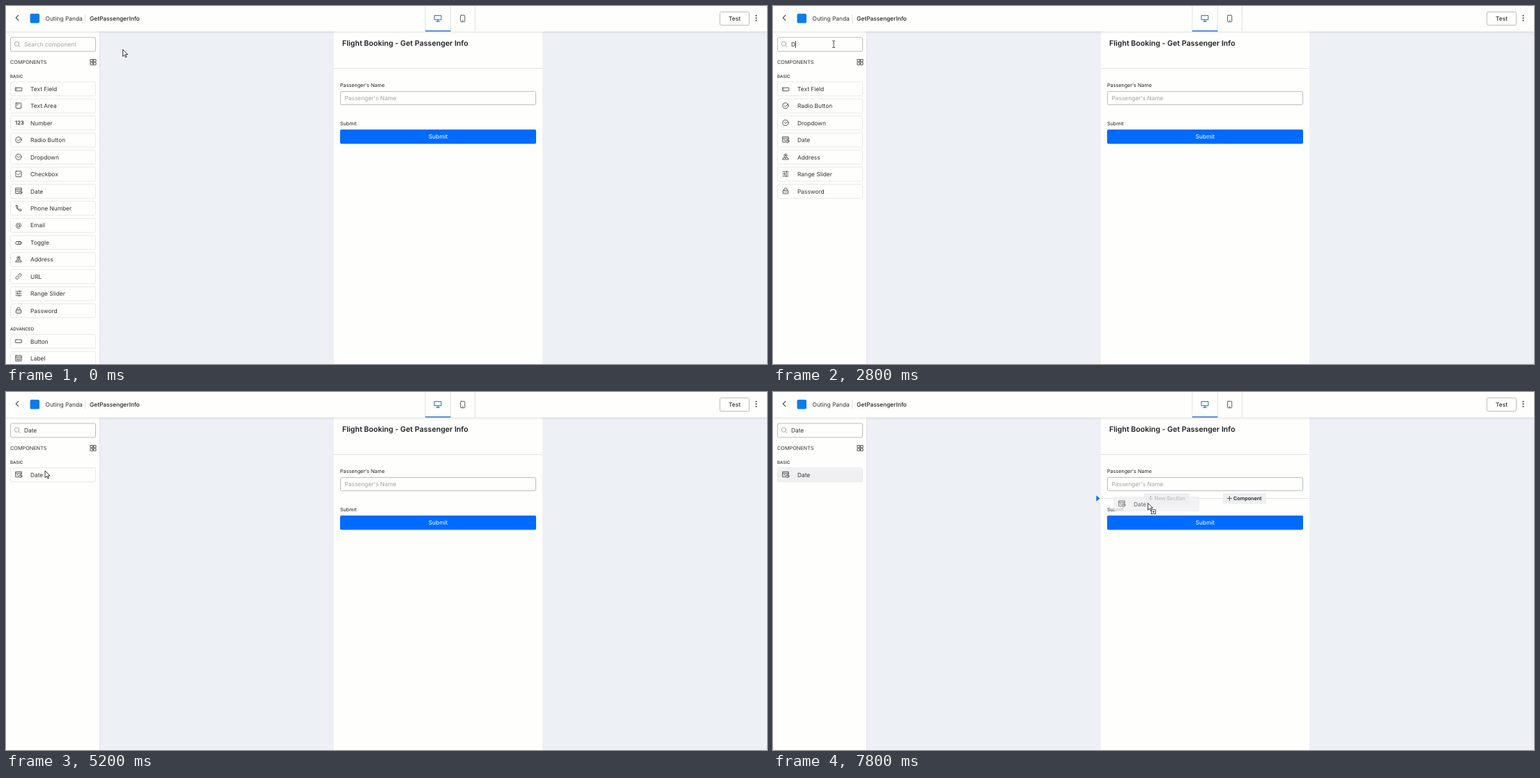
Write an HTML page that moves like this. It is 1091x513 px and loops after 8 s.

```html
<!DOCTYPE html>
<html lang="en">
<head>
<meta charset="utf-8">
<title>Form builder</title>
<style>
  html, body { margin: 0; width: 100%; height: 100%; overflow: hidden; background: #edf0f4; }
  svg { display: block; width: 1091px; height: 513px; }
  text { font: 8.35px Inter, sans-serif; fill: #333; text-rendering: geometricPrecision; white-space: pre; }
  .small { font-size: 7.2px; fill: #222; }
  .group { font-size: 6.15px; font-weight: 500; }
  .hint { fill: #a3a3a3; }
  .bold { font-weight: 600; }
  .paper { fill: #fefefd; }
  .line { stroke: #e1e2e4; fill: none; }
  .field { fill: #fefefd; stroke: #bbbcbe; }
  .icon { fill: none; stroke: #3c3c3c; stroke-width: .85; stroke-linejoin: round; stroke-linecap: round; }
  .icon text { stroke: none; }
  .card { fill: #fefefd; stroke: #e9e9eb; }
  .picked .card { fill: #f0f0f2; stroke: #ececef; }
</style>
</head>
<body>
<svg viewBox="0 0 1091 513">
  <defs>
    <linearGradient id="shade" x2="0" y2="1">
      <stop stop-color="#000" stop-opacity=".1"/><stop offset="1" stop-color="#000" stop-opacity="0"/>
    </linearGradient>
  </defs>
  <rect width="1091" height="513" fill="#edf0f4"/>

  <!-- form -->
  <rect class="paper" x="470" y="36" width="299" height="477"/>
  <text class="bold" x="482" y="56.6" style="font-size:10.6px;fill:#1d1f24">Flight Booking - Get Passenger Info</text>
  <path class="line" d="M470 89.5h299"/>
  <text class="small" x="479" y="115.7">Passenger's Name</text>
  <rect class="field" x="479.5" y="122.5" width="280" height="19" rx="2"/>
  <text class="hint" x="485.5" y="135.2">Passenger's Name</text>
  <text class="small" x="479" y="171.3">Submit</text>
  <rect x="479" y="177" width="281" height="20.5" rx="2" fill="#006bff"/>
  <text x="619.5" y="190.2" text-anchor="middle" style="fill:#fff">Submit</text>

  <!-- insertion marker -->
  <g id="marker">
    <path class="line" d="M470 152.5h298"/>
    <path d="M463.5 148.2l5 4.3-5 4.3z" fill="#006bff"/>
    <path d="M532 145h65v15.500h-65zM645 145h62v15.500h-62z" fill="#eeeff2"/>
    <path class="icon" d="M538.500 152.500h6m-3-3v6M651.500 152.500h6m-3-3v6"/>
    <text class="small bold" x="547" y="155">New Section</text>
    <text class="small bold" x="660" y="155">Component</text>
  </g>

  <!-- sidebar -->
  <rect class="paper" y="36" width="134" height="477"/>
  <path class="line" d="M134.500 37v476"/>
  <rect class="field" x="6.500" y="45" width="122" height="20" rx="2"/>
  <g class="icon" style="stroke:#999"><circle cx="15.500" cy="54.200" r="3.200"/><path d="M18 56.800l2 2"/></g>
  <text id="query" x="26" y="57.900"></text>
  <path id="caret" stroke="#222" stroke-width=".9" d="M0 50v10"/>
  <text x="6" y="83.300" style="font-size:7.300px">COMPONENTS</text>
  <path class="icon" d="M121.200 76.500h3.300v3.300h-3.300zm4.500 0h3.300v3.300h-3.300zm-4.500 4.500h3.300v3.300h-3.300zm4.500 0h3.300v3.300h-3.300z"/>
  <g id="list"></g>

  <!-- header -->
  <rect y="36" width="1091" height="4" fill="url(#shade)"/>
  <rect class="paper" width="1091" height="36.500"/>
  <path class="icon" style="stroke-width:1.100" d="M17.800 13.300l-3.600 3.500 3.600 3.500"/>
  <rect x="34.500" y="11" width="13.500" height="13.500" rx="2" fill="#0b7ce8"/>
  <text x="56.500" y="20.800">Outing Panda</text>
  <path class="line" d="M113.500 12v12M601 0v36M637.500 0v36M672.500 0v36"/>
  <text x="120" y="20.800" style="font-weight:500;fill:#222">GetPassengerInfo</text>
  <rect x="601" y="35" width="36.500" height="1.500" fill="#2c72cf"/>
  <path class="icon" style="stroke:#2367bd;stroke-width:1" d="M614.500 13.700h9.500v6h-9.500zM619.200 19.700v2.500m-2.500 0h5"/>
  <g class="icon"><rect x="651.600" y="13.300" width="6.200" height="9.400" rx="1"/><path d="M654 21h1.400"/></g>
  <rect class="field" x="1023.500" y="8.500" width="42" height="19" rx="2"/>
  <text x="1044.500" y="21" text-anchor="middle" style="font-weight:500">Test</text>
  <g fill="#333"><circle cx="1075.500" cy="13.800" r="1"/><circle cx="1075.500" cy="17.300" r="1"/><circle cx="1075.500" cy="20.800" r="1"/></g>

  <g id="ghost" opacity=".77"></g>
  <g id="cursor"></g>
</svg>
<script>
const $ = id => document.getElementById(id);
const path = d => `<path d="${d}"/>`;
const box = (x, y, w, h, r = .5) => `<rect x="${x}" y="${y}" width="${w}" height="${h}" rx="${r}"/>`;
const disc = (r, x = 0, y = 0) => `<circle cx="${x}" cy="${y}" r="${r}"/>`;

// Icons are drawn around their own centre.
const icons = {
  'Text Field': box(-4.5, -1.3, 9.3, 4.6) + path('M-2.700 .3v1.400'),
  'Text Area': box(-3.9, -3.9, 7.6, 7.6) + path('M-2 -2h1.500M-2 -.6v.2'),
  'Number': '<text class="bold" x="-5" y="2.900" style="font-size:7.700px">123</text>',
  'Radio Button': disc(4.1) + path('M-1.900 0l1.500 1.500 4-4'),
  'Dropdown': disc(4.1) + path('M-1.900 -.7l1.900 1.800 1.900 -1.800'),
  'Checkbox': box(-4, -4, 8, 8) + path('M-2 0l1.500 1.500 3-3.200'),
  'Date': path('M0 3.300h-4.300v-7.500h8.600v3.500M-4.300 -2h8.600M-2.500 .3h2') + disc(2.2, 2.8, 2) + path('M2.800 1v1.200h.8'),
  'Phone Number': path('M-3.600 -3.600l1.700-.3 1.100 2.300-1 1q1.200 2 2.800 2.700l1-1 2.100 1.200-.5 1.700Q-2.500 4-3.600 -3.600z'),
  'Email': '<text x="0" y="2.700" text-anchor="middle" style="font-size:8.800px">@</text>',
  'Toggle': box(-4.3, -1, 8.2, 4, 2) + disc(2, 1.9, 1),
  'Address': path('M-1.500 1h-1.500l-1.300 2.700h8.600l-1.300-2.700h-1.500M0 1.800Q-4.600 -4 0 -4.200 4.600 -4 0 1.800z') + disc(.7, 0, -2),
  'URL': path('M-1.300 1.300l2.600-2.600M-.5 -2l1.400-1.400a1.800 1.800 0 0 1 2.600 2.600l-1.500 1.500M.5 2l-1.400 1.400a1.800 1.800 0 0 1-2.600-2.600l1.500-1.500'),
  'Range Slider': path('M-4 -3h8M-4 0h8M-4 3h8M1.500 -4v2M-1.500 -1v2M1 2v2'),
  'Password': box(-3.8, -.8, 7.6, 4.6, 1) + path('M-2.300 -.8v-1.200a2.300 2.300 0 0 1 4.600 0v1.200M-2 1.500h.2M0 1.500h.2M2 1.500h.2'),
  'Button': box(-4.3, -2.2, 8.8, 4.4),
  'Label': box(-4.2, -4, 8.4, 8) + path('M-4.200 -1.700h8.400M-2.500 .3h2M-2.500 2h5M1.500 .3h1')
};
const names = Object.keys(icons);
const groups = { BASIC: names.slice(0, 14), ADVANCED: names.slice(14) };

const card = (name, y) => `<g transform="translate(0 ${y})">
  <rect class="card" x="6.500" y="-10" width="122" height="20" rx="2"/>
  <g class="icon" transform="translate(18 -.3)">${icons[name]}</g>
  <text x="35" y="3.100">${name}</text></g>`;

function listMarkup(query) {
  let y = 100.5, markup = '';
  for (const [title, members] of Object.entries(groups)) {
    const found = members.filter(name => name.toLowerCase().includes(query.toLowerCase()));
    if (!found.length) continue;
    markup += `<text class="group" x="6" y="${y + 2.2}">${title}</text>`;
    found.forEach((name, i) => markup += card(name, y + 18.2 + i * 24.46));
    y += 19.5 + found.length * 24.46;
  }
  return markup;
}

const arrow = '<path d="M0 0v9.800l2.300-2.100 1.600 3.500 1.600-.7-1.600-3.500h3.200z" fill="#fff" stroke="#222" stroke-width=".9"/>';
const cursors = {
  arrow,
  beam: '<path d="M-2 -4.800h1.500l.5.500.500-.5h1.500M0 -4.300v8.600M-2 4.800h1.500l.5-.5.500.5h1.500" fill="none" stroke="#333" stroke-width=".9"/>',
  denied: '<g fill="none" stroke="#c8141c" stroke-width="1.400"><circle r="4"/><path d="M-2.800 -2.800l5.600 5.600"/></g>',
  copy: arrow + '<g fill="#fff" stroke="#444" stroke-width=".9"><rect x="5" y="9.500" width="6" height="6"/><path d="M8 10.800v3.400M6.300 12.500h3.400"/></g>'
};

// time, x, y
const route = [
  [0, 167.5, 62.5], [600, 167.5, 62.5], [800, 147, 66], [1000, 105, 57], [1200, 87, 54.7],
  [4200, 87, 54.7], [4400, 84, 60], [5200, 56, 113], [5400, 55.5, 117.5], [6000, 55.5, 117.5],
  [6200, 189.2, 141.2], [6400, 290, 152], [6600, 375, 163], [6800, 375, 163],
  [7000, 483.5, 162], [7800, 537.5, 159.2]
];
function pointerAt(t) {
  const i = Math.max(1, route.findIndex(p => p[0] >= t));
  const [t0, x0, y0] = route[i - 1], [t1, x1, y1] = route[i];
  const k = (t - t0) / (t1 - t0);
  return [x0 + (x1 - x0) * k, y0 + (y1 - y0) * k];
}
function pointerKind(t, x, y) {
  if (t >= 7000) return 'copy';
  if (t >= 5800) return 'denied';
  return x < 129 && y > 45 && y < 66 ? 'beam' : 'arrow';
}

const STEP = 200, LOOP = 8000;
const show = (id, on) => $(id).setAttribute('display', on ? 'inline' : 'none');
const move = (id, x, y) => $(id).setAttribute('transform', `translate(${x} ${y})`);
let shown = -1;

function draw(t) {
  const typed = 'Date'.slice(0, t < 2800 ? 0 : (t - 2600) / STEP);
  const query = $('query');
  query.textContent = typed || 'Search component';
  query.setAttribute('class', typed ? '' : 'hint');
  $('list').innerHTML = listMarkup(typed);
  $('list').setAttribute('class', t >= 5400 ? 'picked' : '');
  show('caret', (t >= 1600 && t < 2200) || (t >= 2600 && t < 4200));
  move('caret', typed ? 26.3 + query.getComputedTextLength() : 25.6, 0);

  const [x, y] = pointerAt(t);
  $('cursor').innerHTML = cursors[pointerKind(t, x, y)];
  move('cursor', x, y);
  show('marker', t >= 7000);
  show('ghost', t >= 6200);
  move('ghost', x - 55.5, y - 117.5);
}

$('ghost').innerHTML = card('Date', 118.7);
$('ghost').setAttribute('class', 'picked');

function tick(now) {
  const t = Math.floor(now % LOOP / STEP) * STEP;
  if (t !== shown) draw(shown = t);
  requestAnimationFrame(tick);
}
tick(performance.now());
</script>
</body>
</html>
```
